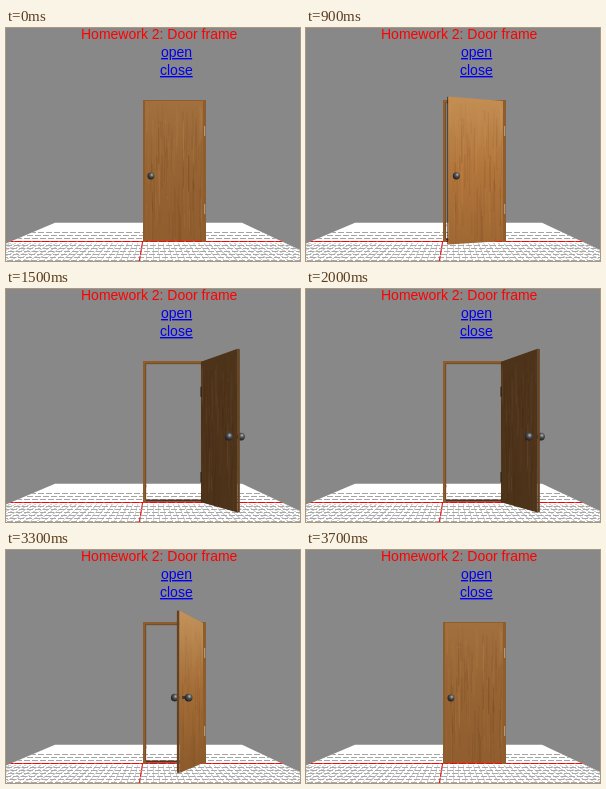
Recreate the animation shown at these times as an HTML page. Size 294 by 233 pixels, loop 4000 ms.

```html
<!DOCTYPE html>
<html lang="en">
<head>
<meta charset="utf-8">
<title>Door frame</title>
<style>
  html, body { margin: 0; width: 100%; height: 100%; overflow: hidden; background: #888; }
  svg { display: block; width: 294px; height: 233px; }
  text { font: 14px "Liberation Sans", Arial, sans-serif; }
  .link { text-decoration: underline 1px; text-underline-offset: 2px; text-decoration-skip-ink: none; }
</style>
</head>
<body>
<svg id="stage" viewBox="0 0 294 233">
  <defs>
    <radialGradient id="knob" cx=".62" cy=".34" r=".7">
      <stop offset="0" stop-color="#b8b8b8"/>
      <stop offset=".4" stop-color="#505050"/>
      <stop offset="1" stop-color="#181818"/>
    </radialGradient>
    <linearGradient id="glow" gradientUnits="userSpaceOnUse" x1="0" y1="60" x2="0" y2="225">
      <stop offset="0" stop-color="#ffdca0" stop-opacity=".42"/>
      <stop offset=".5" stop-color="#ffdca0" stop-opacity="0"/>
      <stop offset=".5" stop-color="#301400" stop-opacity="0"/>
      <stop offset="1" stop-color="#301400" stop-opacity=".25"/>
    </linearGradient>
    <clipPath id="floorClip"><path d="M49 194.7H236L294 222V233H0V215.5Z"/></clipPath>
  </defs>
  <rect width="294" height="233" fill="#888"/>
  <g clip-path="url(#floorClip)">
    <rect y="190" width="294" height="43" fill="#fff"/>
    <g id="floor" shape-rendering="crispEdges"></g>
    <g stroke="#f00" fill="none">
      <path d="M0 213.5H294" stroke="#d84848" shape-rendering="crispEdges"/>
      <path d="M0 213.5H294" stroke-dasharray="7 2" shape-rendering="crispEdges"/>
      <path d="M136.5 214L133.3 233" stroke-dasharray="6 1"/>
      <path d="M140 196.5L139.7 198.5"/>
    </g>
  </g>
  <g id="frame">
    <path d="M138.5 214V73.5H198.5V214" fill="none" stroke="#8d5d2e" stroke-width="3"/>
    <path d="M139.7 211V74.7H197" fill="none" stroke="#6b421f" stroke-width=".7"/>
    <path d="M140 211.6H197" stroke="#54301c" stroke-width="2.4"/>
    <path d="M198.7 98v10M198.7 176v10" stroke="#b8b0a4" stroke-width=".9"/>
  </g>
  <g id="door"></g>
  <text x="75" y="11" fill="#f00">Homework 2: Door frame</text>
  <text id="open" class="link" x="155" y="29">open</text>
  <text id="close" class="link" x="154" y="47">close</text>
</svg>
<script>
const LOOP = 4000, STEP = 100, SPEED = 0.17, MAX_ANGLE = 115;
const CENTER = { x: 147, y: 151 }, DISTANCE = 370;
const HINGE = 50, WIDTH = 58, THICK = 2.4, TOP = -78, BOTTOM = 62;
const RAD = Math.PI / 180;
const byId = id => document.getElementById(id);
const clamp = (v, lo, hi) => Math.min(hi, Math.max(lo, v));

function random(seed) {
  const v = Math.sin(seed * 127.1 + 3.7) * 43758.5453;
  return v - Math.floor(v);
}

function drawFloor() {
  let out = '';
  // Lines running toward the viewer meet at the vanishing point.
  for (let x = -210; x < 210; x += 5) {
    const at = y => CENTER.x + x * (y - CENTER.y) / 63;
    out += `<path d="M${at(215)} 215L${at(233)} 233" stroke="#d2d2d2"/>`;
  }
  const row = (y, color, offset) =>
    out += `<path d="M0 ${y + .5}H294" stroke="${color}" stroke-dasharray="6 2" stroke-dashoffset="${offset}"/>`;
  [204, 207, 210].forEach((y, i) => row(y, '#a4a4a4', i * 3));
  for (let y = 217, i = 0; y < 233; y += 3, i++) row(y, '#a8a8a8', i * 3);
  byId('floor').innerHTML = out;
}

// u runs from the hinge to the free edge, n is the offset from the front face.
function projector(degrees) {
  const cos = Math.cos(degrees * RAD), sin = Math.sin(degrees * RAD);
  return (u, n, y) => {
    const x = HINGE - u * cos + n * sin, z = u * sin + n * cos;
    const s = DISTANCE / (DISTANCE - z);
    return { x: CENTER.x + x * s, y: CENTER.y + y * s, s };
  };
}

const point = p => p.x.toFixed(2) + ' ' + p.y.toFixed(2);
const tint = k => `rgb(${[183, 121, 61].map(c => Math.round(c * k))})`;

function doorMarkup(angle) {
  const at = projector(angle);
  const frontSeen = angle < 90 && Math.tan(angle * RAD) * HINGE < DISTANCE;
  const face = (corners, fill, opacity = 1) =>
    `<path d="M${corners.map(point).join('L')}Z" fill="${fill}" opacity="${opacity}"/>`;
  const line = (u, n, y1, y2, color, width) =>
    `<path d="M${point(at(u, n, y1))}L${point(at(u, n, y2))}" stroke="${color}" stroke-width="${width}"/>`;
  const knob = side => {
    const base = at(52, side > 0 ? 0 : -THICK, -3);
    const tip = at(52, side > 0 ? 6 : -6 - THICK / 2, -3);
    return `<path d="M${point(base)}L${point(tip)}" stroke="#3c3a38" stroke-width="3"/>` +
      `<circle cx="${tip.x}" cy="${tip.y}" r="${3.4 * tip.s}" fill="url(#knob)"/>`;
  };

  const n = frontSeen ? 0 : -THICK;
  const shade = frontSeen ? Math.cos((angle - 35) * RAD) : .42;
  const corners = [at(0, n, TOP), at(WIDTH, n, TOP), at(WIDTH, n, BOTTOM), at(0, n, BOTTOM)];
  let out = angle > 40 ? knob(frontSeen ? -1 : 1) : '';
  if (angle > 0) {
    out += face([at(WIDTH, 0, TOP), at(WIDTH, 0, BOTTOM), at(WIDTH, -THICK, BOTTOM), at(WIDTH, -THICK, TOP)],
      tint(.15 + .5 * Math.sin(angle * RAD) ** 2));
  }
  out += face(corners, tint(shade));

  const scale = Math.max(.15, Math.abs(corners[1].x - corners[0].x) / WIDTH);
  for (let i = 0; i < 90; i++) {
    const u = 1 + random(i) * (WIDTH - 2), y = TOP + random(i + 150) * 120;
    const end = Math.min(BOTTOM, y + 10 + random(i + 300) * 40);
    const color = random(i + 450) < .55 ? 'rgba(60,28,5,.13)' : 'rgba(255,200,130,.1)';
    out += line(u, n, y, end, color, (.4 + .6 * random(i + 600)) * scale);
  }
  if (frontSeen) out += face(corners, 'url(#glow)', Math.max(.3, Math.sin(2 * angle * RAD)));
  else [-48, 37].forEach(y => out += line(.3, n, y - 5, y + 5, '#2b211a', 1.3));
  return out + knob(frontSeen ? 1 : -1);
}

function angleAt(t) {
  if (t < 800) return 0;
  const angle = t < 3000 ? 3 + (t - 800) * SPEED : 113 - (t - 3000) * SPEED;
  return clamp(angle, 0, MAX_ANGLE);
}

function render(time) {
  const t = Math.floor(time % LOOP / STEP) * STEP;
  byId('door').innerHTML = doorMarkup(angleAt(t));
  byId('open').setAttribute('fill', t === 700 || t === 1900 ? '#f00' : '#00e');
  byId('close').setAttribute('fill', t === 2900 ? '#f00' : '#00e');
}

drawFloor();
const start = performance.now();
function tick() {
  render(performance.now() - start);
  requestAnimationFrame(tick);
}
tick();
</script>
</body>
</html>
```
